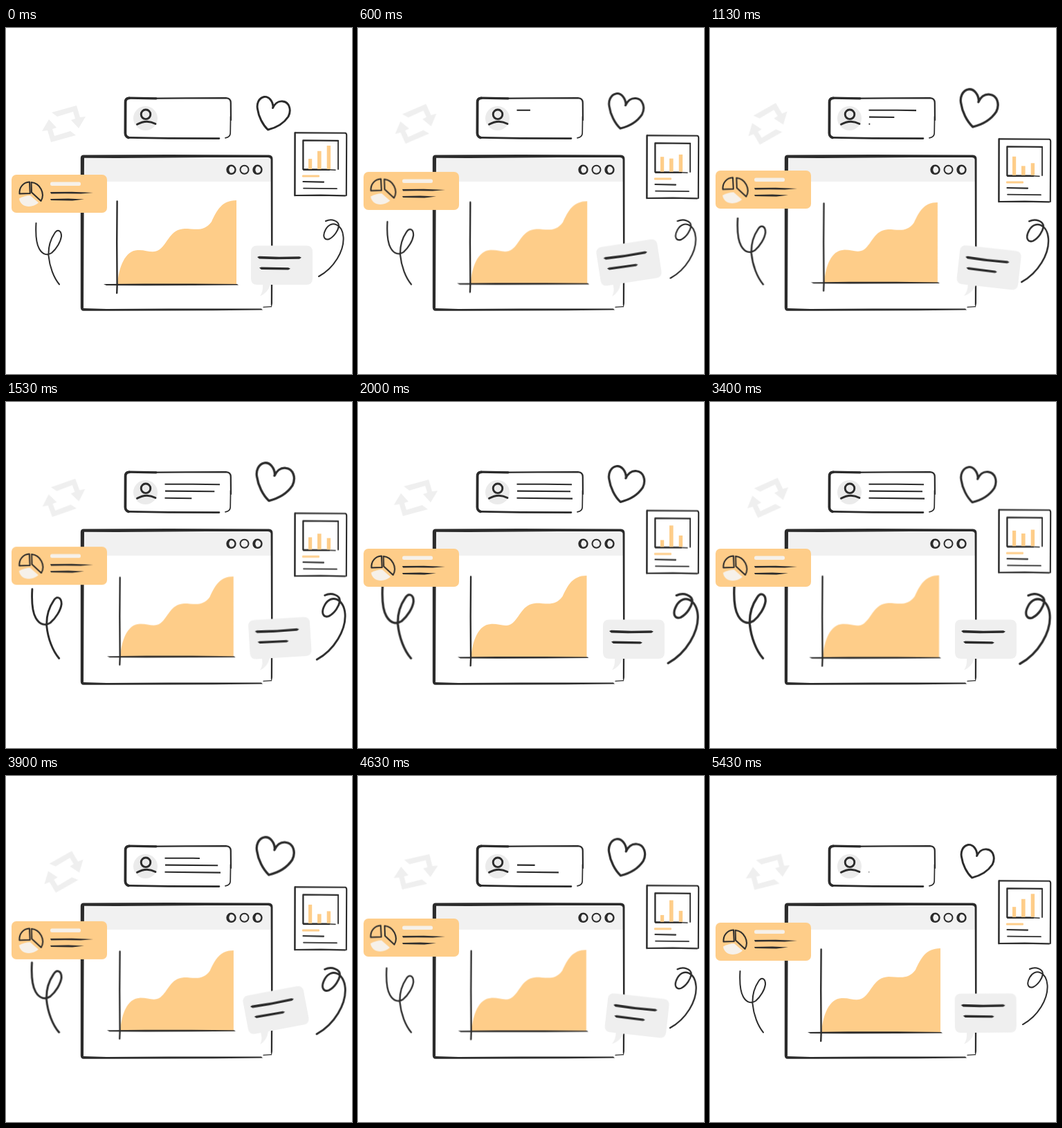
An HTML page for the animation above (5510 ms loop, 500 px wide and 500 px high).

```html
<!DOCTYPE html>
<html lang="en">
<head>
<meta charset="utf-8">
<title>Dashboard sketch</title>
<style>
  html, body { margin: 0; width: 100%; height: 100%; overflow: hidden; background: #fff; }
  svg { display: block; width: 100%; height: 100%; }

  .ink { fill: none; stroke: #2b2b2b; stroke-width: 2.4; stroke-linecap: round; stroke-linejoin: round; }
  .bold { stroke-width: 2.9; }
  .brush { fill: #2b2b2b; }
  .amber { fill: #fecd89; }
  .pale { fill: #efefef; }
  .white { fill: #f6f1ea; }

  .move { animation: 2750ms cubic-bezier(.37, 0, .63, 1) infinite; }
  .slow { animation-duration: 5500ms; }

  .chart { animation-name: shrink; transform-origin: 245px 315px; }
  .heart { animation-name: beat; transform-origin: 387px 123.5px; }
  .doc { animation-name: sink; }
  .bar { animation-name: level; transform-origin: 0 204px; }
  .repeat { animation-name: swing; transform-origin: 83.5px 138.5px; }
  .slice { animation-name: burst; animation-duration: 1833.33ms; }
  .card { animation-name: lift; }
  .bubble { animation-name: wag; transform-origin: 370px 386px; }
  .curl { animation-name: stretch; stroke-width: 2; }
  .text { animation-timing-function: linear; stroke-dasharray: 1 2; stroke-linecap: butt; stroke-width: 2.1; }

  @keyframes shrink { 50% { transform: scale(.95); } }
  @keyframes beat { 50% { transform: translate(2.7px, -8.1px) scale(1.155); } }
  @keyframes sink { 50% { transform: translateY(9.7px); } }
  @keyframes level {
    0%, 100% { transform: scaleY(var(--a)); }
    41% { transform: scaleY(var(--b)); }
    69% { transform: scaleY(var(--c)); }
  }
  @keyframes swing {
    0%, 100% { transform: rotate(0deg); }
    41% { transform: rotate(-14deg); }
    67% { transform: rotate(3deg); }
    75% { transform: rotate(0deg); }
    95% { transform: rotate(3deg); }
  }
  @keyframes burst { 50% { transform: translate(var(--x), var(--y)); } }
  @keyframes lift {
    0%, 36.36%, 63.64%, 100% { transform: translateY(0); }
    18.18%, 81.82% { transform: translateY(-6.2px); }
  }
  @keyframes wag {
    0%, 36.36%, 63.64%, 100% { transform: rotate(0deg); }
    8.18%, 71.82% { transform: rotate(-11deg); }
    20%, 83.64% { transform: rotate(6.5deg); }
    29.1%, 92.74% { transform: rotate(-4deg); }
  }
  @keyframes stretch { 50% { transform: scale(var(--x), var(--y)); stroke-width: 2.8; } }
  @keyframes write1 { 0%, 7.1%, 83.6%, 100% { stroke-dashoffset: 1; } 22.7%, 63.6% { stroke-dashoffset: 0; } }
  @keyframes write2 { 0%, 13%, 90.9%, 100% { stroke-dashoffset: 1; } 29%, 70.7% { stroke-dashoffset: 0; } }
  @keyframes write3 { 0%, 20.2%, 98.9%, 100% { stroke-dashoffset: 1; } 36%, 79.3% { stroke-dashoffset: 0; } }
</style>
</head>
<body>
<svg viewBox="0 0 500 500">
  <!-- repeat arrows -->
  <g class="repeat move pale">
    <path id="arrow" d="M62 132L73 144 67 146 70 156 93 149 101 155 65 165 60 148 52 149z"/>
    <use href="#arrow" transform="rotate(180 83.5 138.5)"/>
  </g>

  <!-- profile -->
  <g class="ink">
    <path stroke-width="3.8" d="M178 101.4Q172.600 101.600 172.600 107L172.400 152Q172.600 157 177 158.400"/>
    <path stroke-width="3.2" d="M178 101.200L217 101.800"/>
    <path stroke-width="2.2" d="M190 101.800L260 101.400 318 101.200Q324.700 101.600 324.800 108L325 133"/>
    <path stroke-width="1.7" d="M324.600 128L324.200 152Q324 158 317 158.800"/>
    <path stroke-width="2.6" d="M177 158.400L235 159.400 308 159.600"/>
  </g>
  <circle cx="201.5" cy="130.5" r="17.5" fill="#ebebeb"/>
  <g class="ink bold">
    <circle cx="202" cy="124.800" r="6.800"/>
    <path d="M189.500 139.300Q203 131.500 216 138.500"/>
  </g>
  <path class="ink text move slow" style="animation-name:write1" pathLength="1" d="M229.5 118.8L270 118.8 309 119.3"/>
  <path class="ink text move slow" style="animation-name:write2" pathLength="1" d="M230 128.6L307 129.3"/>
  <path class="ink text move slow" style="animation-name:write3" pathLength="1" d="M229.5 138.8L310 139.6"/>

  <!-- heart -->
  <path class="heart move ink bold" d="M386 115C386 106 380 98.500 373 99.500C365 101 362 110 363.500 117C365 128 371 140 378.500 147C391 144 402 137 408 128C413 118 409 107 400 106C393 105 388 110 385.500 115.500"/>

  <!-- document -->
  <g class="doc move">
    <g class="ink">
      <path stroke-width="2.5" d="M417.600 151.600L417.400 242"/>
      <path stroke-width="2.1" d="M418 151.400L490 151.800Q492.200 152 492.200 155L491.800 242"/>
      <path stroke-width="2.1" d="M418 242L455 241.600 490 242.400"/>
      <path stroke-width="2.3" d="M429.400 204L429.400 162.400 480 162.800"/>
      <path stroke-width="1.8" d="M480 163L480 204"/>
      <path stroke-width="2.6" d="M430 204.600L467 204.800"/>
      <path stroke-width="1.5" d="M466 204.800L476 205.200"/>
    </g>
    <g class="amber">
      <rect class="bar move" style="--a:.44;--b:.8;--c:.29" x="437" y="170" width="5.2" height="34"/>
      <rect class="bar move" style="--a:.77;--b:.4;--c:.92" x="450" y="170" width="5.6" height="34"/>
      <rect class="bar move" style="--a:1;--b:.52;--c:.47" x="463.7" y="170" width="5.4" height="34"/>
      <rect x="428" y="212.6" width="25" height="3" rx="1"/>
    </g>
    <g class="ink">
      <path stroke-width="2.2" d="M429.500 222L459 222.600"/>
      <path stroke-width="1.7" d="M430 231.600L478 232.200"/>
    </g>
  </g>

  <!-- window -->
  <rect x="113" y="187" width="270" height="35" fill="#f1f1f1"/>
  <path class="brush" d="M107.800 188Q107.800 183.400 112 183.400L235 183 380 183.600Q385.200 183.800 385.500 189L385.500 315 385 398 383.800 404 382.800 400 383 315 382.600 190Q382 187 378 187L290 187 160 188 113 187.800 112.600 260 112 405 145 406 235 405.400 369 405.400 371 407.400 300 408.200 150 408.800 112 408.800Q108 408.600 107.800 404z"/>
  <path class="ink" style="stroke-width:1.2" d="M372 403.4L383.4 402.6"/>
  <g class="ink">
    <circle cx="325.500" cy="204.800" r="6"/>
    <circle cx="344.500" cy="204.800" r="6" stroke-width="2"/>
    <circle cx="363.500" cy="204.800" r="6"/>
    <path stroke-width="3" d="M322.500 200Q319 205 322.500 209.500M360.500 200Q357 205 360.500 209.500"/>
  </g>

  <!-- area chart -->
  <g class="chart move">
    <path class="amber" d="M161 371C163 345 172 322 190 321C203 320 212 327 222 320C234 311 237 291 258 290C274 290 286 295 297 280C305 263 312 249 333 249V371z"/>
    <path class="ink" d="M160.600 250.500L160.200 310 160.600 372 160.200 383"/>
    <path class="brush" d="M141 370L200 369.400 270 369.400 334 370 336 371.600 270 372 200 372.200 145 372z"/>
  </g>

  <!-- curls -->
  <path class="curl move slow ink" style="--x:1.27;--y:1.22;transform-origin:79px 371px"
    d="M43.500 282C42.500 300 44 312 48 319C53 328 60 329 66 325C73 319 79 309 80 301C80 292 74 290 70 297C64 306 61 317 61.500 329C63 345 69 361 77 370.500"/>
  <path class="curl move slow ink" style="--x:1.25;--y:1.27;transform-origin:471px 277px"
    d="M452 359C474 347 489 322 487.500 302C486 283 470 277 462 291C456 302 461 307 467 305C475 301 480 292 481 286C481 279 471 275 462 279"/>

  <!-- pie card -->
  <g class="card move slow">
    <rect class="amber" x="8" y="212" width="138" height="55" rx="7"/>
    <rect class="white" x="64" y="222.500" width="44" height="5.600" rx="2.500"/>
    <path class="brush" d="M64 237L95 236.800 126 238 108 239.600 85 239.200 65 239.600zM64 247L90 246.400 113 247.400 96 249.400 65 249z"/>
    <path class="slice move white" style="--x:-1px;--y:1.500px" d="M19 246.500Q27 242 35 242L47 252.500C38 261 21 260 19 246.500z"/>
    <g class="ink">
      <path class="slice move" style="--x:-1.200px;--y:-.5px" stroke-width="2" d="M34 222.500L34.800 239 19.500 239.500C19 230 25 223 34 222.500z"/>
      <path class="slice move" style="--x:2px;--y:-.5px" stroke-width="2" d="M36.500 223C49 224 57 239 50.500 250L37 237.500z"/>
    </g>
  </g>

  <!-- chat bubble -->
  <g class="bubble move slow">
    <path class="pale" d="M363 314.500H434Q443 314.500 443 323.500V362Q443 371 434 371H382Q378 383 367 387.500 372 380 371 371H363Q354 371 354 362V323.500Q354 314.500 363 314.500z"/>
    <path class="brush" d="M363 331L366 329.800 395 330.800 424 330.200 427 331.800 424 333.800 390 334.200 366 333.600zM366 346.600L369 345.400 408 346.200 411 347.800 408 349.600 385 349.200 369 349z"/>
  </g>
</svg>
<script>
  const LOOP = 5510;
  const LAST = 5430;
  const parts = document.getAnimations();
  parts.forEach(part => part.pause());

  // Poses hold for 30 ms and 70 ms in turn.
  function hold(ms) {
    const beat = ms % 100;
    return Math.min(LAST, ms - beat + (beat < 30 ? 0 : 30));
  }

  function draw() {
    const time = hold(performance.now() % LOOP);
    for (const part of parts) part.currentTime = time;
    requestAnimationFrame(draw);
  }
  draw();
</script>
</body>
</html>
```
